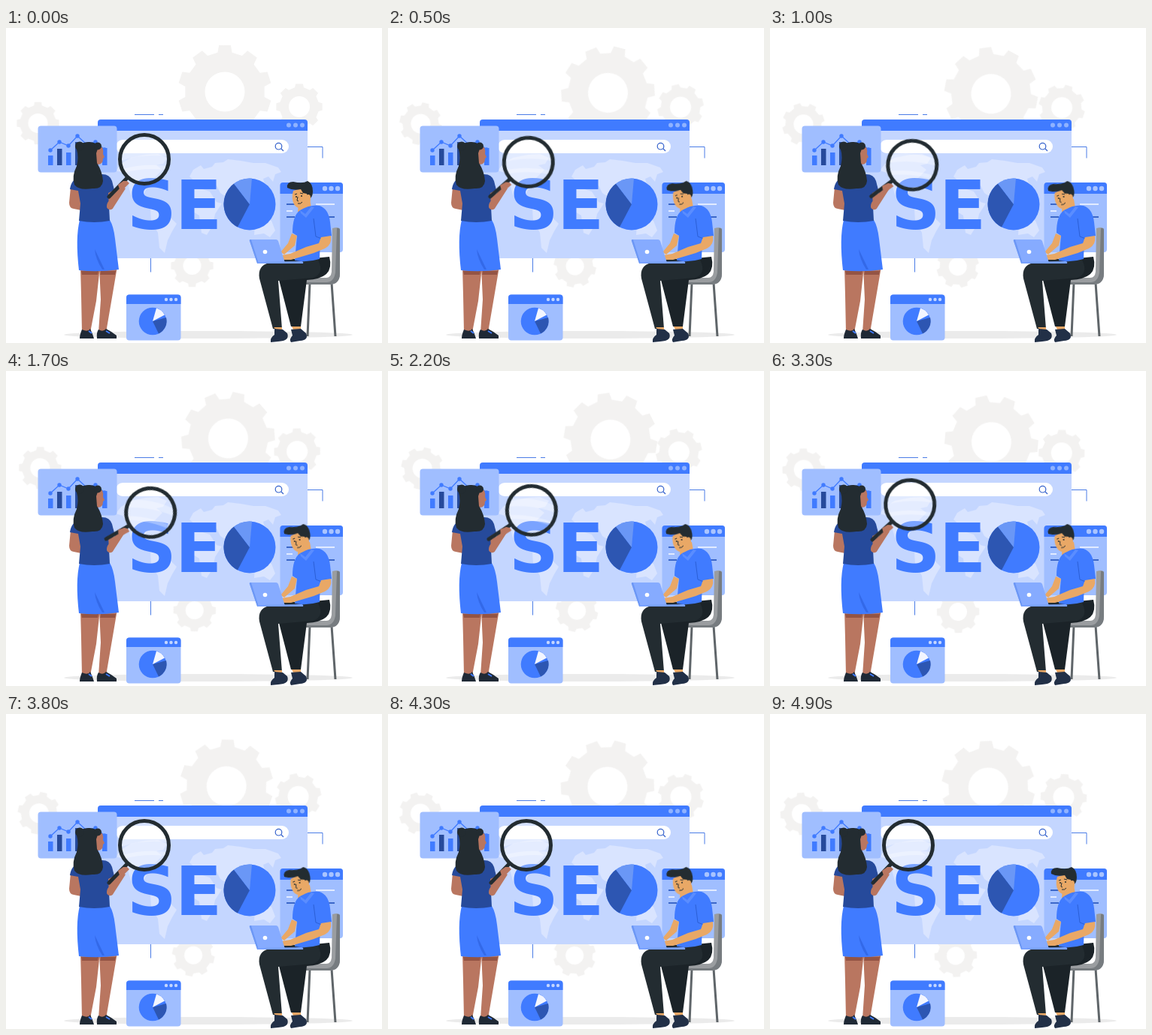
These frames come from a looping animation (500 px wide and 420 px high, 5000 ms). An HTML page:

```html
<!DOCTYPE html>
<html lang="en">
<head>
<meta charset="utf-8">
<title>SEO illustration</title>
<style>
html, body { margin: 0; width: 100%; height: 100%; overflow: hidden; background: #fff; }
svg { display: block; width: 500px; height: 420px; }
.blue { fill: #407bff; } .pale { fill: #a0beff; } .deep { fill: #264a9b; }
.wedge { fill: #2d56b2; } .dark { fill: #232c31; } .brown { fill: #b97660; } .peach { fill: #e9a866; }
.line { fill: none; stroke: #407bff; stroke-width: 1.3; }
.thin { fill: none; stroke: #4a7ce6; stroke-width: 1; }
.word { font: bold 91px "DejaVu Sans", Inter, sans-serif; text-anchor: middle; }
.drift { animation: drift 5s linear infinite; }
.spin { animation: spin 5s linear infinite; }
.lens { transform-origin: 139px 211px; animation: lens 5s linear infinite; }
.head { transform-origin: 398px 240px; animation: nod 5s ease-in-out infinite; }
@keyframes drift {
  0% { transform: translate(0, 0); }
  20% { transform: translate(calc(var(--x) * 3px), calc(var(--y) * 2.8px)); }
  40% { transform: translate(calc(var(--x) * 5px), calc(var(--y) * 5.8px)); }
  58% { transform: translate(calc(var(--x) * 4.4px), calc(var(--y) * 8.4px)); }
  76% { transform: translate(calc(var(--x) * 2.2px), calc(var(--y) * 11.2px)); }
  100% { transform: translate(calc(var(--x) * -1px), calc(var(--y) * 13.2px)); }
}
@keyframes spin { to { transform: rotate(var(--turn)); } }
@keyframes lens {
  0%, 75%, 100% { transform: rotate(0deg); }
  35% { transform: rotate(16.5deg); }
}
@keyframes nod {
  0%, 100% { transform: rotate(0deg); }
  15%, 80% { transform: rotate(-9deg); }
}
</style>
</head>
<body>
<svg viewBox="0 0 500 420">
  <ellipse cx="269" cy="409" rx="192" ry="5" fill="#ebebeb"/>
  <g id="gears" fill="#f3f2f1"></g>

  <path class="thin" d="M171 115.500h26M203 115.500h6M401 158.500h20v15M192.500 307v18.500"/>

  <!-- main window -->
  <rect x="123" y="130" width="278" height="177" rx="3" fill="#c4d6ff"/>
  <g fill="#d9e4ff">
    <path d="M153 181l13-8 20-4 16-1 12 5-5 8-9 2 8 6-9 9-8 8-7 14-8 7 7 13-7-4-10-14-5-18-6-11-9-3z"/>
    <path d="M192 241l12 2 14 9 9 9-6 10-6 12-4 17-7-7-2-20-9-16z"/>
    <path d="M244 198l5-9 10-6 4 5 11-3 4-5 11-1 6-4 17 2 17 3 16 0 17 6 4 6-8 3-3 10-6-7-7 3 4 13-8 8-6 12-5-4-6-8-7 12-5-10-9-5-6 7-9-6-5-10-10 1-4 4-8-4z"/>
    <path d="M240 217l15-4 16 5 9 14 7 2-9 14-3 15-8 13-7-3-3-23-13-8-6-13z"/>
    <path d="M331 261l13-7 9 3 5 13-7 9-8-5-13 2z"/>
  </g>
  <path class="blue" d="M122 137V126q0-4 4-4H397q4 0 4 4V137z"/>
  <g fill="#8fb2ff"><circle cx="376" cy="129.500" r="3"/><circle cx="385" cy="129.500" r="3"/><circle cx="394" cy="129.500" r="3"/></g>
  <rect x="146" y="149" width="230" height="18" rx="9" fill="#fff"/>
  <g fill="none" stroke="#3562cc" stroke-width="1.200"><path d="M366 161l3 3"/><circle cx="362.500" cy="157.700" r="4.300"/></g>
  <text class="word blue" x="193.700" y="268">S</text>
  <text class="word blue" x="256" y="268">E</text>
  <circle class="blue" cx="324" cy="235" r="34.500"/>
  <path class="wedge" d="M324 235L308 265.500A34.500 34.500 0 0 1 303 207.600z"/>
  <path d="M324 235L303 207.600A34.500 34.500 0 0 1 327 200.600z" fill="#6a97f6"/>

  <!-- chart card -->
  <rect class="pale" x="42.500" y="130.500" width="105" height="62" rx="4"/>
  <g id="chart"></g>

  <!-- small pie window -->
  <rect class="pale" x="160" y="355.500" width="72.500" height="61" rx="4"/>
  <path class="blue" d="M160 368v-8.500q0-4 4-4h64.500q4 0 4 4v8.500z"/>
  <g fill="#c4d6ff"><circle cx="213" cy="362" r="2.200"/><circle cx="219.500" cy="362" r="2.200"/><circle cx="226" cy="362" r="2.200"/></g>
  <circle class="blue" cx="195" cy="391" r="18.300"/>
  <path class="wedge" d="M195 391l18-5A18.300 18.300 0 0 1 203 407.500z"/>
  <path d="M195 391l5-17.500A18.300 18.300 0 0 1 211 382.500z" fill="#f3f6ff"/>

  <!-- text window -->
  <rect class="pale" x="364.500" y="206" width="83.500" height="93" rx="4"/>
  <path class="blue" d="M364.500 221v-11q0-4 4-4h75.500q4 0 4 4v11z"/>
  <g fill="#a9c4ff"><circle cx="424" cy="214" r="3.200"/><circle cx="432.500" cy="214" r="3.200"/><circle cx="441" cy="214" r="3.200"/></g>
  <path d="M412 235h25M373 244h8" stroke="#e2ebff" stroke-width="2"/>
  <path d="M373 235h12M373 252h11M421 252h16" stroke="#3b67c9" stroke-width="2"/>

  <!-- seated man -->
  <path d="M404 340l-3 71M433 340l5 71" stroke="#5f6569" stroke-width="3"/>
  <path d="M434 267q9-3 10 2v58q0 15-14 15h-38v-9h34q6 0 7-8z" fill="#9a9da0"/>
  <path d="M440 267q4-1 4 2v58q0 15-14 15h-38v-3h34q10 0 12-13z" fill="#777c80"/>
  <path d="M390 309l40-4q4 15-4 23-8 7-26 8l-8 62h-13l-17-66q-3-18 16-19z" fill="#1b2328"/>
  <path class="dark" d="M415 309q-37-4-65 4-16 4-13 21l18 67h12l-5-64 46-4q16-5 7-24z"/>
  <path d="M356 399h11v5l-4 2zM380 398h12v6l-8 2z" class="peach"/>
  <path d="M357 401l11 1 6 5q4 10-12 11l-10 1q-1-6 5-10zM379 402l13-1 7 6q4 9-8 10l-12 2q-3-4 2-9z" fill="#223047"/>
  <path class="peach" d="M389 232l15-4 2 12-9 9-9-4z"/>
  <path class="blue" d="M391 243q14-8 26-6 12 4 14 22l2 18-10 4-5-1-1 28q-17 5-33 2l3-33-6-4q0-23 10-30z"/>
  <path d="M409 254l3 24 8 3" fill="none" stroke="#2b5fd6" stroke-width="1"/>
  <path class="peach" d="M380 274l7 3-3 13-14 12-5-3 10-12z"/>
  <path class="peach" d="M419 279l13-2q2 12-8 17-13 6-28 10l-17 5h-14l1-6 12-2 21-9 17-5z"/>
  <path d="M391 243l7 5 8-10 4 1-11 14-7-6z" fill="#5a8dff"/>
  <g class="head">
    <path class="peach" d="M382 217q15-6 22 2 4 17-8 21-9 2-13-5-4-8-1-18z"/>
    <path class="dark" d="M374 213q-1-8 8-8 13 3 19-1 7 3 7 14 0 8-6 11l-2-8-5-1-3-5q-11 2-18-2z"/>
    <ellipse class="peach" cx="402" cy="226" rx="3" ry="4"/>
    <circle class="dark" cx="386" cy="225" r="1"/><circle class="dark" cx="393" cy="224" r="1"/>
    <path d="M384 222l3-1M391 220l4 1M388 225l-1 5 2 1M388 234q4 1 6-2" fill="none" stroke="#232c31" stroke-width="1"/>
  </g>
  <path d="M324 284q-1-2 2-2h33q2 0 3 2l9 29h-37z" fill="#86abff"/>
  <path d="M324 284q-1-2 2-2l10 32h-2z" fill="#6c97f5"/>
  <path d="M334 312l59-1q3 0 2 3h-59z" fill="#78a1ff"/>
  <circle cx="344.500" cy="298.500" r="2.800" fill="#fff"/>

  <!-- standing woman -->
  <path class="brown" d="M99 318h26l-5 46-8 42h-11l-1-50zM124 318h24l-8 47-7 41h-10l3-44z"/>
  <path d="M100 324h23l-1 5h-21zM126 324h20l-1 5h-20z" fill="#945444"/>
  <path d="M101 402q8 4 11-1l3 7 2 6H98q0-5 3-12zM123 402q6 4 10-1l7 4 7 5v4h-26q-1-8 2-12z" fill="#1f2935"/>
  <path d="M110 404l4 3M133 404l5 3" stroke="#407bff" stroke-width="2"/>
  <path class="brown" d="M86 212l13 5 1 26-10-2q-6-1-6-8z"/>
  <path class="blue" d="M98 256h40q5 8 7 25l5 41q-28 4-53 1-5-43 1-67z"/>
  <path d="M128 322q-9-14-10-27l13 27z" fill="#3369e8"/>
  <path class="brown" d="M132 212l11-1 1 17-2 11-5 3-4-5z"/>
  <path class="deep" d="M98 199l30-4q10 0 13 9l3 12-8 4 2 37q-21 4-41 0l2-23-3-17-11-2q2-14 13-16z"/>
  <path class="brown" d="M119 159h9q2 5 1 9l2 4-2 2q0 8-7 8l-6-2z"/>
  <path class="dark" d="M94 162q4-10 15-10 10-1 14 6l-3 9 1 13q7 11 8 24-1 11-14 10-18 3-24-5-4-11 3-25 3-12 0-22z"/>
  <circle class="dark" cx="98" cy="157.500" r="6"/><circle class="dark" cx="122" cy="157.500" r="5"/>

  <!-- magnifier -->
  <path class="brown" d="M137 242q-5-2-2-9l17-23 7 4-16 25q-2 4-6 3z"/>
  <g class="lens">
    <path d="M137 225l24-25" stroke="#232c31" stroke-width="5" stroke-linecap="round"/>
    <circle cx="184" cy="175" r="32" fill="#fff" fill-opacity=".3"/>
    <path d="M154 166q29-10 59-4l2 9q-31-4-62 6zM155 188q28-8 59-4l-2 5q-29-3-55 4z" fill="#fff" fill-opacity=".3"/>
    <circle cx="184" cy="175" r="32.500" fill="none" stroke="#232c31" stroke-width="5"/>
    <path class="brown" d="M149 209l7-5 5 0 3 3-6 6-6 5z"/>
  </g>
</svg>
<script>
const make = (tag, attrs, parent) => {
  const el = document.createElementNS("http://www.w3.org/2000/svg", tag);
  for (const k in attrs) el.setAttribute(k, attrs[k]);
  return parent.appendChild(el);
};

// Toothed ring centred on 0,0 with a round hole
function gearPath(teeth, r, hole) {
  const step = 2 * Math.PI / teeth, pts = [];
  for (let i = 0; i < teeth; i++) {
    for (const [k, f] of [[-.29, .85], [-.2, 1], [.2, 1], [.29, .85]]) {
      const a = (i + k) * step;
      pts.push((Math.sin(a) * r * f).toFixed(2) + " " + (-Math.cos(a) * r * f).toFixed(2));
    }
  }
  return `M${pts.join("L")}ZM${-hole} 0a${hole} ${hole} 0 1 0 ${2 * hole} 0a${hole} ${hole} 0 1 0 ${-2 * hole} 0z`;
}

function gear(x, y, teeth, r, hole, dx, dy, turn) {
  const spot = make("g", { transform: `translate(${x} ${y})` }, gears);
  const drift = make("g", { class: "drift", style: `--x:${dx};--y:${dy}` }, spot);
  make("path", {
    class: "spin", style: `--turn:${turn}deg`, "fill-rule": "evenodd", d: gearPath(teeth, r, hole)
  }, drift);
}

const gears = document.getElementById("gears");
gear(291, 85, 10, 62.5, 26.5, 1, 1, 144);
gear(42.5, 127, 8, 28.5, 13, .65, .47, 135);
gear(390, 105, 8, 31, 14, -.65, .45, -135);
gear(247.5, 317, 8, 28.5, 12, .75, .42, 135);

const chart = document.getElementById("chart");
const tops = [170, 161, 166, 152, 164, 158, 160];
const marks = [163, 152, 157, 144, 155, 152, 162];
const at = i => 59 + i * 12;
tops.forEach((y, i) => make("rect", {
  class: i == 1 || i == 3 ? "deep" : "blue", x: at(i) - 3, y, width: 6.5, height: 183 - y
}, chart));
make("polyline", { class: "line", points: marks.map((y, i) => at(i) + "," + y).join(" ") }, chart);
marks.forEach((y, i) => make("circle", { class: "blue", cx: at(i), cy: y, r: 2.7 }, chart));
</script>
</body>
</html>
```
